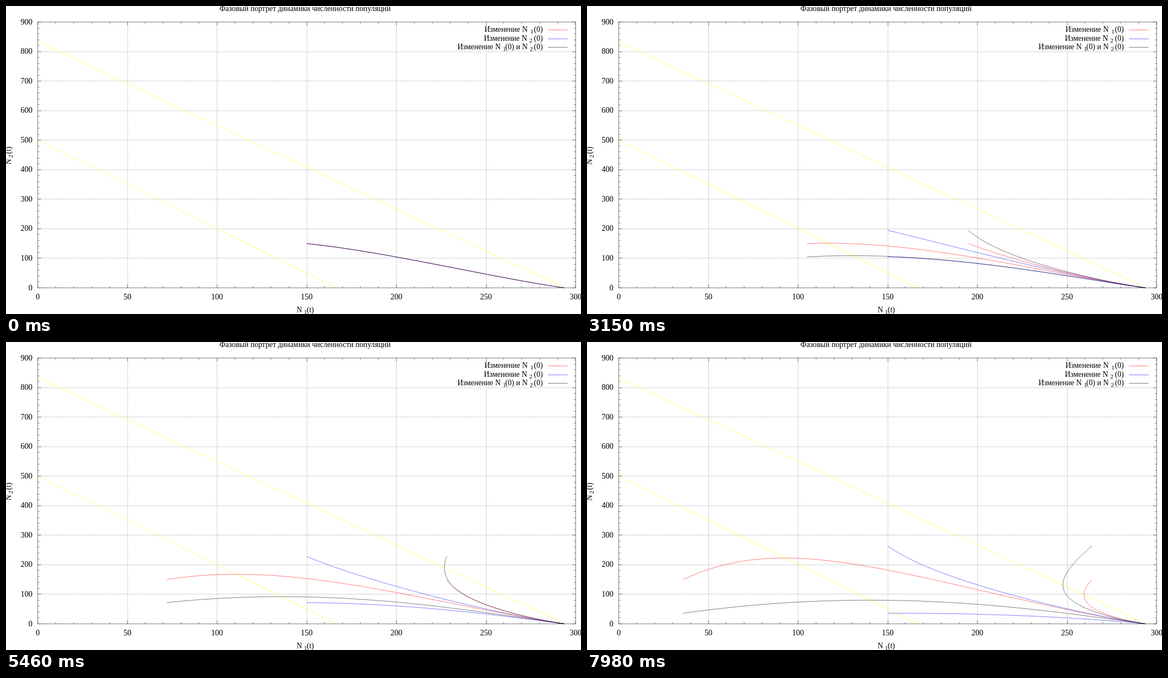
Animation, 1023 px wide and 548 px high, one loop 8000 ms. Source, as an HTML page with a canvas:

```html
<!DOCTYPE html>
<html lang="ru">
<head>
<meta charset="utf-8">
<style>
  html, body { margin: 0; width: 100%; height: 100%; overflow: hidden; background: #fff; }
  canvas, svg { position: absolute; left: 0; top: 0; }
  text { font: 13.6px "Liberation Serif", "Times New Roman", serif; white-space: pre; }
  .num { font-size: 14px; }
  .sub { font-size: 10.9px; }
  .mid { text-anchor: middle; }
  .end { text-anchor: end; }
</style>
</head>
<body>
<canvas id="plot" width="1023" height="548"></canvas>
<svg id="labels" width="1023" height="548">
  <text class="mid" x="532" y="9">Фазовый портрет динамики численности популяций</text>
  <text x="517" y="545">N</text><text class="sub" x="530" y="548">1</text><text x="535" y="545">(t)</text>
  <g transform="translate(9 282) rotate(-90)">
    <text x="0" y="0">N</text><text class="sub" x="12" y="3">2</text><text x="19" y="0">(t)</text>
  </g>
  <text class="end" x="928" y="46">Изменение N</text><text class="sub" x="933" y="49">1</text><text class="end" x="955" y="46">(0)</text>
  <text class="end" x="927" y="62">Изменение N</text><text class="sub" x="931" y="65">2</text><text class="end" x="955" y="62">(0)</text>
  <text class="end" x="880" y="77">Изменение N</text><text class="sub" x="884" y="80">1</text><text class="end" x="928" y="77">(0) и N</text><text class="sub" x="932" y="80">2</text><text class="end" x="955" y="77">(0)</text>
</svg>
<script>
const LEFT = 56.5, RIGHT = 1013.5, TOP = 28.5, BOTTOM = 501.5;
const LOOP = 8000, STEP = 70;
const RED = '#f00', BLUE = '#00f', BLACK = '#000', YELLOW = '#ff0';
const ctx = document.getElementById('plot').getContext('2d');
const labels = document.getElementById('labels');
ctx.lineWidth = 0.5;

const px = x => LEFT + x / 300 * (RIGHT - LEFT);
const py = y => BOTTOM - y / 900 * (BOTTOM - TOP);
const snap = v => Math.floor(v) + 0.5;
const sx = x => snap(px(x));
const sy = y => snap(py(y));

function stroke(points, color, dash = []) {
  ctx.strokeStyle = color;
  ctx.setLineDash(dash);
  ctx.beginPath();
  for (const [x, y] of points) ctx.lineTo(x, y);
  ctx.stroke();
}

const line = (x0, y0, x1, y1, color = BLACK, dash) => stroke([[x0, y0], [x1, y1]], color, dash);

// Two competing populations
const rate = ([x, y]) => [
  x * (5 - 0.017 * x - 0.006 * y),
  y * (5 - 0.03 * x - 0.01 * y)
];
const move = (p, v, h) => [p[0] + v[0] * h, p[1] + v[1] * h];

function trajectory(x, y) {
  const h = 0.01, points = [];
  let p = [x, y];
  for (let i = 0; i < 200; i++) {
    points.push([px(p[0]), py(p[1])]);
    const a = rate(p);
    const b = rate(move(p, a, h / 2));
    const c = rate(move(p, b, h / 2));
    const d = rate(move(p, c, h));
    p = move(p, a.map((v, j) => v + 2 * b[j] + 2 * c[j] + d[j]), h / 6);
  }
  return points;
}

function drawGrid() {
  const dots = [1, 2];
  for (let v = 50; v < 300; v += 50) line(sx(v), BOTTOM, sx(v), v === 250 ? 82 : TOP, BLACK, dots);
  for (let v = 100; v < 900; v += 100) line(LEFT, sy(v), RIGHT, sy(v), BLACK, dots);
}

function drawFrame() {
  for (let v = 0; v <= 300; v += 10) {
    const len = v % 50 ? 3 : 6;
    line(sx(v), TOP, sx(v), TOP + len);
    line(sx(v), BOTTOM, sx(v), BOTTOM - len);
  }
  for (let v = 0; v <= 900; v += 20) {
    const len = v % 100 ? 3 : 6;
    line(LEFT, sy(v), LEFT + len, sy(v));
    line(RIGHT, sy(v), RIGHT - len, sy(v));
  }
  ctx.strokeRect(LEFT, TOP, RIGHT - LEFT, BOTTOM - TOP);
}

function draw(d) {
  ctx.fillStyle = '#fff';
  ctx.fillRect(0, 0, 1023, 548);
  drawGrid();
  line(px(0), py(2500 / 3), px(5 / 0.017), py(0), YELLOW);
  line(px(0), py(500), px(500 / 3), py(0), YELLOW);
  for (const [kx, ky, color] of [[1, 0, RED], [0, 1, BLUE], [1, 1, BLACK]]) {
    // Both signs coincide at the start, so draw that curve once
    for (const s of d ? [d, -d] : [0]) stroke(trajectory(150 + kx * s, 150 + ky * s), color);
  }
  [RED, BLUE, BLACK].forEach((color, i) => {
    const y = snap(42.4 + i * 15.6);
    line(964, y, 999, y, color);
  });
  drawFrame();
}

function addNumber(x, y, value, align) {
  const t = document.createElementNS(labels.namespaceURI, 'text');
  t.setAttribute('x', x);
  t.setAttribute('y', y);
  t.setAttribute('class', 'num ' + align);
  t.textContent = value;
  labels.append(t);
}
for (let v = 0; v <= 300; v += 50) addNumber(px(v), 521.5, v, 'mid');
for (let v = 0; v <= 900; v += 100) addNumber(47, py(v) + 4, v, 'end');

const start = performance.now();
let shown = -1;
function tick() {
  const d = Math.floor((performance.now() - start) % LOOP / STEP);
  if (d !== shown) draw(shown = d);
  requestAnimationFrame(tick);
}
tick();
</script>
</body>
</html>
```
